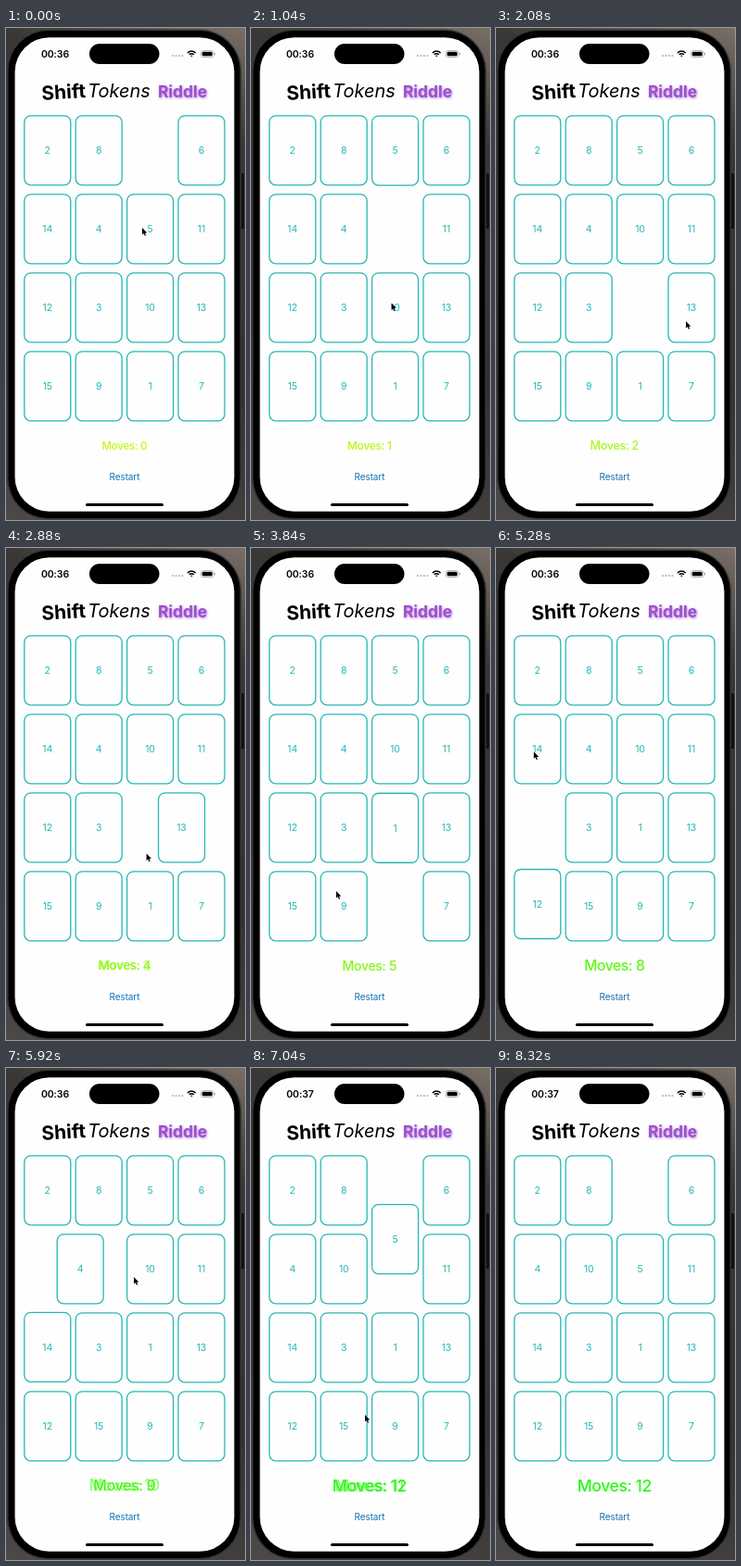
Animation of 258x532 px, one loop 8400 ms. Source, as an HTML page with a canvas:

```html
<!DOCTYPE html>
<html lang="en">
<head>
<meta charset="utf-8">
<title>Sliding tiles</title>
<style>
html, body { margin: 0; width: 100%; height: 100%; overflow: hidden; background: #333; }
canvas { display: block; width: 258px; height: 532px; }
</style>
</head>
<body>
<canvas id="stage"></canvas>
<script>
const W = 258, H = 532, LOOP = 8400, STEP = 80;
const FONT = 'Inter, "Liberation Sans", sans-serif';
const TEAL = '#26b8b4';
const TILE_W = 50, TILE_H = 75;
const canvas = document.getElementById('stage');
const ctx = canvas.getContext('2d');
const dpr = window.devicePixelRatio || 1;
canvas.width = W * dpr;
canvas.height = H * dpr;

const start = [2, 8, 0, 6, 14, 4, 5, 11, 12, 3, 10, 13, 15, 9, 1, 7];

// tapped tile and time
const taps = [
  [5, 350], [10, 1200], [13, 2200], [13, 2700], [1, 3200], [9, 3860],
  [15, 4210], [12, 4800], [14, 5280], [4, 5809], [10, 6250], [5, 6856]
];

const smooth = v => v * v * (3 - 2 * v);

// critically damped spring, 0.55 s response
function spring(ms) {
  const a = Math.max(0, ms) * 2 * Math.PI / 550;
  return 1 - (1 + a) * Math.exp(-a);
}

const cell = i => ({ x: 19.8 + (i % 4) * 55.4, y: 94.8 + Math.floor(i / 4) * 85 });

// each tap swaps its tile with the gap
const order = start.slice();
const slides = taps.map(([n, time]) => {
  const from = order.indexOf(n), to = order.indexOf(0);
  order[to] = n;
  order[from] = 0;
  return { n, time, from: cell(from), to: cell(to) };
});

// pointer: a few free points, plus a visit to every tapped tile
const path = [
  [0, 147, 216], [2080, 205, 317], [3840, 92, 371], [4560, 84, 316],
  [5920, 138, 226], [7040, 123, 375], [7200, 103, 560]
].concat(slides.map(({ time, from }) =>
  [time, from.x + TILE_W / 2 - 4, from.y + TILE_H / 2 + 3]
)).sort((a, b) => a[0] - b[0]);

function roundRect(x, y, w, h, r) {
  ctx.beginPath();
  ctx.roundRect(x, y, w, h, r);
}

function fillRound(x, y, w, h, r, color) {
  roundRect(x, y, w, h, r);
  ctx.fillStyle = color;
  ctx.fill();
}

function text(str, x, y, style, color, spacing = 0) {
  ctx.font = style + ' ' + FONT;
  ctx.letterSpacing = spacing + 'px';
  ctx.fillStyle = color;
  ctx.textAlign = 'center';
  ctx.textBaseline = 'alphabetic';
  ctx.fillText(str, x + spacing / 2, y);
}

function drawPhone() {
  const back = ctx.createLinearGradient(W, 0, 0, H);
  back.addColorStop(0, '#7a6f67');
  back.addColorStop(0.19, '#3a3836');
  back.addColorStop(0.6, '#333');
  back.addColorStop(1, '#4c4a48');
  ctx.fillStyle = back;
  ctx.fillRect(0, 0, W, H);
  fillRound(253, 157, 4, 60, 1.5, '#111');
  fillRound(1, 1.5, 253, 530, 45, '#353535');
  fillRound(2.5, 3, 250, 527, 43, '#000');
  fillRound(9.6, 10.3, 236.8, 512.4, 37, '#fefefe');
  fillRound(90, 17, 75.5, 22, 11, '#000');
  fillRound(86, 514, 84, 3, 1.5, '#000');
}

function drawStatus(t) {
  text(t < 6400 ? '00:36' : '00:37', 53, 31.5, '600 10.5px', '#000', -0.1);
  ctx.fillStyle = '#b5b5b5';
  for (let i = 0; i < 4; i++) {
    ctx.beginPath();
    ctx.arc(180.2 + i * 3.4, 30, 1.1, 0, Math.PI * 2);
    ctx.fill();
  }
  ctx.strokeStyle = '#000';
  ctx.lineWidth = 1.5;
  for (let r = 1; r < 8; r += 2.6) {
    ctx.beginPath();
    ctx.arc(200.3, 31.3, r, -Math.PI * 0.75, -Math.PI * 0.25);
    ctx.stroke();
  }
  roundRect(210.5, 24.5, 13.5, 7, 2.2);
  ctx.lineWidth = 0.7;
  ctx.strokeStyle = '#999';
  ctx.stroke();
  fillRound(211.7, 25.7, 11, 4.6, 1.2, '#000');
  fillRound(225, 26.8, 1, 2.4, 0.5, '#999');
}

function drawTitle() {
  ctx.save();
  ctx.translate(62.5, 76.5);
  ctx.rotate(-0.06);
  text('Shift', 0, 0, 'bold 21px', '#000');
  ctx.restore();
  text('Tokens', 122, 75, 'italic 400 20px', '#000');
  ctx.save();
  ctx.shadowColor = 'rgba(155, 70, 215, 0.75)';
  ctx.shadowBlur = 3 * dpr;
  ctx.shadowOffsetX = ctx.shadowOffsetY = 0.7 * dpr;
  text('Riddle', 190.5, 75, 'bold 17.4px', '#9a4fcb');
  ctx.restore();
}

function drawTile(n, { x, y }) {
  roundRect(x, y, TILE_W, TILE_H, 7);
  ctx.lineWidth = 1.3;
  ctx.strokeStyle = TEAL;
  ctx.stroke();
  text(String(n), x + 25, y + 41.3, '400 10.5px', TEAL, -0.2);
}

function drawBoard(t) {
  start.forEach((n, i) => {
    if (!n) return;
    const pos = cell(i);
    for (const s of slides) {
      if (s.n !== n) continue;
      const k = spring(t - s.time);
      pos.x += (s.to.x - s.from.x) * k;
      pos.y += (s.to.y - s.from.y) * k;
    }
    drawTile(n, pos);
  });
}

function drawLabel(n, alpha) {
  const size = 11.6 + 0.5 * n;
  ctx.globalAlpha = Math.min(1, alpha * 1.6);
  text('Moves: ' + n, 128, 451.5 + size * 0.36, `450 ${size}px`,
    `hsl(${74 + 3.4 * n}, 94%, 53%)`, -0.025 * size);
  ctx.globalAlpha = 1;
}

function drawCounter(t) {
  const count = slides.filter(s => t >= s.time).length;
  const k = count ? spring(t - slides[count - 1].time) : 1;
  if (k < 0.99) drawLabel(count - 1, 1 - k);
  drawLabel(count, k);
}

function drawPointer(t) {
  const i = path.findIndex(p => p[0] > t);
  if (i < 1) return;
  const [t0, x0, y0] = path[i - 1], [t1, x1, y1] = path[i];
  const k = smooth((t - t0) / (t1 - t0));
  ctx.save();
  ctx.translate(x0 + (x1 - x0) * k, y0 + (y1 - y0) * k);
  ctx.scale(0.88, 0.88);
  const arrow = new Path2D('M0 0V8.6L1.9 6.9 3.3 10 4.7 9.4 3.4 6.4 6 6.2Z');
  ctx.strokeStyle = '#fff';
  ctx.lineWidth = 1;
  ctx.stroke(arrow);
  ctx.fillStyle = '#000';
  ctx.fill(arrow);
  ctx.restore();
}

function draw(now) {
  const t = Math.floor((now % LOOP) / STEP) * STEP;
  ctx.setTransform(dpr, 0, 0, dpr, 0, 0);
  drawPhone();
  drawStatus(t);
  drawTitle();
  drawBoard(t);
  drawCounter(t);
  text('Restart', 128, 488.8, '400 10px', '#1471b8', -0.1);
  drawPointer(t);
}

let begin;
function tick(now) {
  if (begin === undefined) begin = now;
  draw(now - begin);
  requestAnimationFrame(tick);
}
requestAnimationFrame(tick);
</script>
</body>
</html>
```
